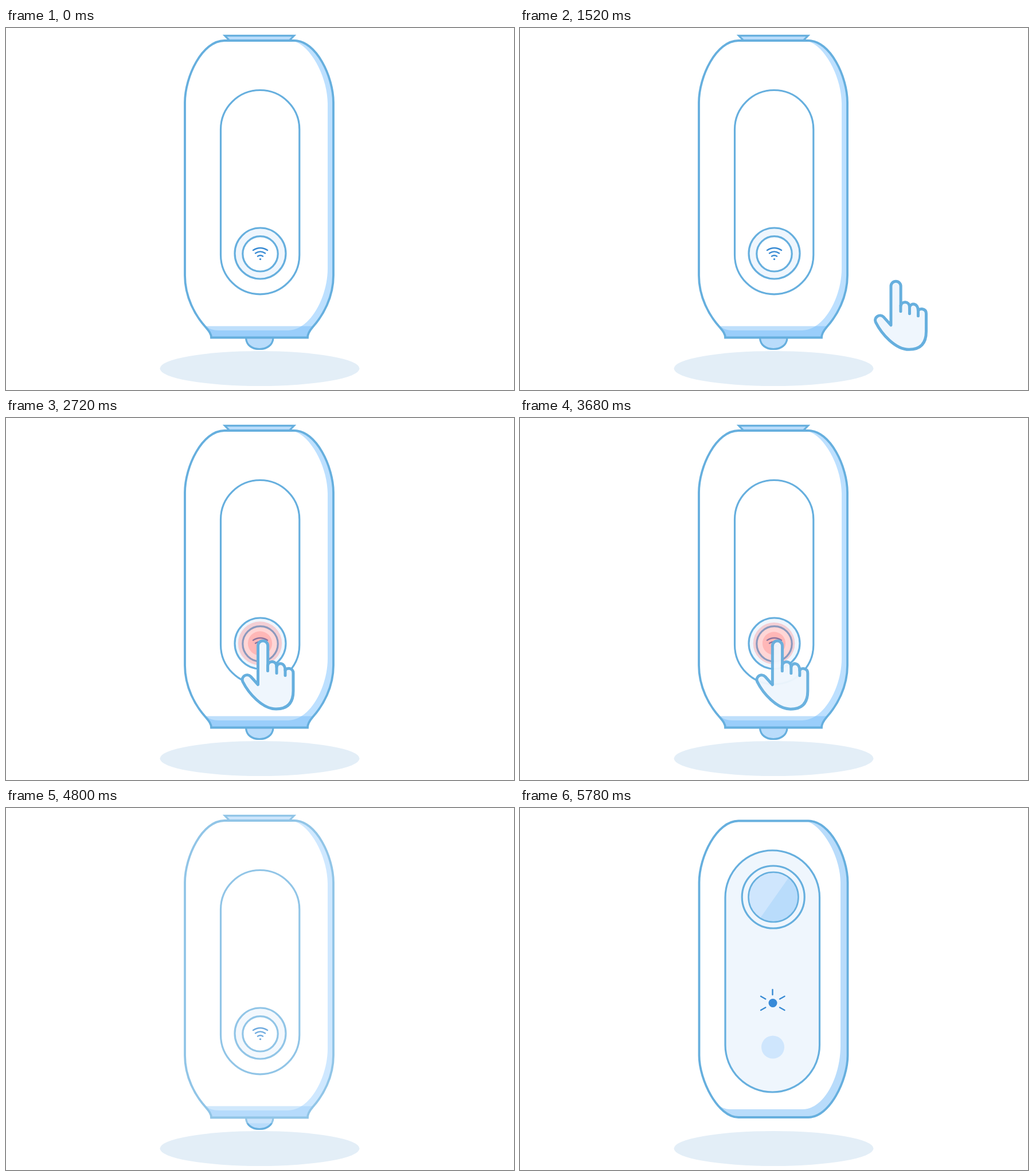
These frames come from a looping animation (886 by 632 pixels, 7540 ms). An HTML page:

```html
<!DOCTYPE html>
<html lang="en">
<head>
<meta charset="utf-8">
<title>Press to connect</title>
<style>
  html, body { margin: 0; width: 100%; height: 100%; overflow: hidden; background: #fff; }
  svg { display: block; width: 886px; height: 632px; }
  .line { stroke: #66afde; stroke-width: 3.2; }
  .bold { stroke-width: 3.8; }
  .white { fill: #fff; }
  .pale { fill: #eff6fd; }
  .sky { fill: #b9dcfb; }
  .glyph { stroke: #378ad3; stroke-width: 2.4; stroke-linecap: round; }
</style>
</head>
<body>
<svg viewBox="0 0 886 632" fill="none">
  <defs>
    <path id="backShape" d="M381 22H503C541 22 571 85 571 130V432C571 470 553 502 535 522C529 529 526 534 526 540.5H358C358 534 354 529 348 522C330 502 312 470 312 432V130C312 85 342 22 381 22Z"/>
    <path id="frontShape" d="M381 22.5H503C541 22.5 571.5 85 571.5 130V432C571.5 475 540 540 503 540H381C345 540 312.5 475 312.5 432V130C312.5 85 343 22.5 381 22.5Z"/>
    <path id="bulb" class="line sky" d="M418.5 541C419 554 430 560.5 442 560.5S465.5 554 466 541"/>
    <clipPath id="inBack"><use href="#backShape"/></clipPath>
    <clipPath id="inFront"><use href="#frontShape"/></clipPath>
    <clipPath id="inLens"><circle cx="442" cy="155.5" r="43.5"/></clipPath>
    <clipPath id="bulbTip"><rect x="410" y="550.5" width="64" height="14"/></clipPath>
  </defs>

  <ellipse cx="442.5" cy="594.5" rx="174" ry="30.5" fill="#e3eef7"/>

  <g id="tip" clip-path="url(#bulbTip)"><use href="#bulb"/></g>

  <g id="back">
    <use href="#bulb"/>
    <path class="line sky" d="M381.5 13.3H502.5L494 22H390Z"/>
    <use href="#backShape" class="white"/>
    <g clip-path="url(#inBack)">
      <path fill="#bde0ff" d="M498 22C530 27 561 85 561 132V420C561 470 530 528 492 528H372C360 528 354 525 350 521L340 545H580V20Z"/>
      <rect x="340" y="520.5" width="205" height="24" fill="#70b8f5" opacity=".45"/>
    </g>
    <use href="#backShape" class="line bold"/>
    <rect class="line white" x="374.5" y="108.5" width="137.3" height="356.3" rx="68.6"/>
    <circle class="line pale" cx="443.5" cy="393.5" r="44.5"/>
    <circle class="line white" cx="443.5" cy="394.3" r="30.7"/>
    <path class="glyph" d="M431 388Q443.5 380 456 388M435 393.3Q443.5 387.5 452 393.3M439 398.5Q443.5 395.5 448 398.5"/>
    <circle cx="443.5" cy="403.6" r="1.7" fill="#378ad3"/>
  </g>

  <g id="ripple" fill="#ff5555" fill-opacity=".24">
    <circle r="38.5"/>
    <circle r="21.3"/>
  </g>

  <g id="hand" class="line" style="stroke-width:5" stroke-linecap="round" stroke-linejoin="round">
    <path class="pale" d="M642.5 517V449A8.6 8.6 0 0 1 659.7 449V483C661 475 675 474 675 486C677 477 690 478 690 492C692 487 704 487 704 497V528C704 548 695 559.5 674 559.5C650 559.5 626 532 616 512C612 503 623 496 630 503Z"/>
    <path d="M659.5 483V493M675 485V497M690 491V501"/>
  </g>

  <g id="front">
    <use href="#frontShape" class="white"/>
    <path class="sky" clip-path="url(#inFront)" d="M496 22C527 27 559 85 559 130V415C559 470 530 526 493 526H366C358 526 352 523 346 519L340 545H580V20Z"/>
    <use href="#frontShape" class="line bold"/>
    <rect class="line pale" x="358" y="74" width="164.5" height="422" rx="82.2"/>
    <circle class="line pale" cx="441.7" cy="155.5" r="54.5"/>
    <circle class="sky" cx="442" cy="155.5" r="43.5"/>
    <path fill="#cfe6fd" clip-path="url(#inLens)" d="M476 111L412 202H390V105Z"/>
    <circle class="line" style="stroke-width:2.6" cx="442" cy="155.5" r="43.5"/>
    <circle cx="441" cy="340.5" r="7.5" fill="#378ad8"/>
    <path class="glyph" d="M440.5 317V326M420 328.7L428.3 333.5M461.5 328.7L453 333.5M420 353L428.3 348.2M461.5 353L453 348.2"/>
    <circle cx="441" cy="417.5" r="20" fill="#cfe6fd"/>
  </g>
</svg>
<script>
const LOOP = 7540, STEP = 80;
const [tip, back, ripple, hand, front] =
  ["tip", "back", "ripple", "hand", "front"].map(id => document.getElementById(id));

const span = (t, from, to) => Math.min(1, Math.max(0, (t - from) / (to - from)));
const mix = (a, b, p) => a + (b - a) * p;
const sine = s => (1 - Math.cos(Math.PI * s)) / 2;
const cubic = s => s < .5 ? 4 * s ** 3 : 1 - 4 * (1 - s) ** 3;
const expoOut = s => s < 1 ? 1 - 2 ** (-10 * s) : 1;
const show = (el, opacity) => {
  el.style.display = opacity > 0 ? "" : "none";
  el.setAttribute("opacity", opacity);
};

// The picture advances at 12.5 steps per second, with one longer step before 4900 ms.
const snap = t => t < 4900
  ? Math.min(4800, Math.floor(t / STEP) * STEP)
  : 4900 + Math.floor((t - 4900) / STEP) * STEP;

function draw(t) {
  const arrive = cubic(span(t, 1000, 2520));
  const leave = span(t, 3640, 4620);
  const x = mix(mix(44, -203, arrive), 0, sine(leave));
  const y = mix(mix(12, -51.5, arrive), 0, sine(leave));
  hand.setAttribute("transform", `translate(${x} ${y})`);
  show(hand, span(t, 900, 1400) * (1 - leave));

  const size = expoOut(span(t, 2400, 2840)) * (1 - sine(span(t, 3620, 4020)));
  ripple.setAttribute("transform", `translate(443 393.5) scale(${size})`);
  show(ripple, size > 0 ? 1 : 0);

  show(back, 1 - span(t, 4640, 5200));
  show(tip, 1 - span(t, 4800, 5300));
  show(front, t >= 5780 ? 1 : 0);
}

const start = performance.now();
function tick() {
  draw(snap((performance.now() - start) % LOOP));
  requestAnimationFrame(tick);
}
tick();
</script>
</body>
</html>
```
